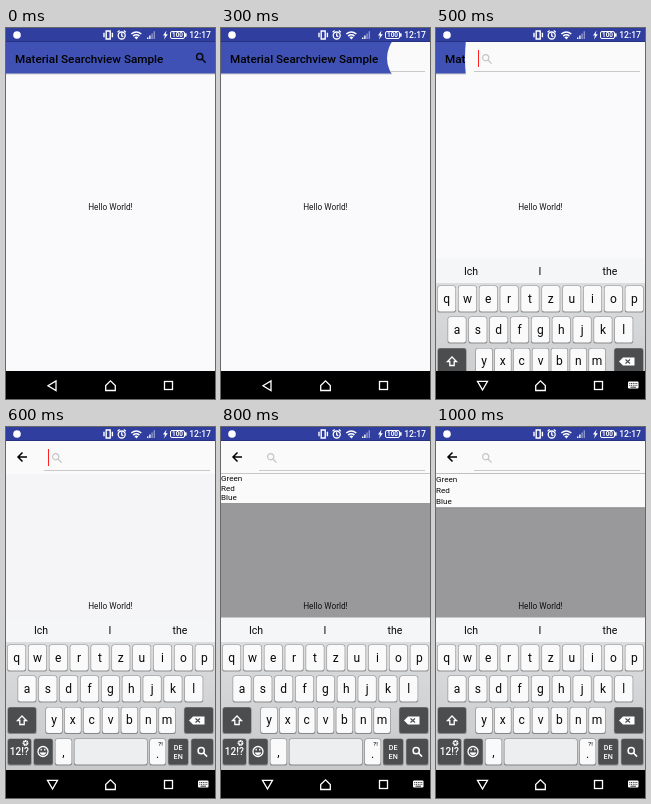
An HTML page that plays this animation: 209x371 px, repeating every 1100 ms.

```html
<!DOCTYPE html>
<html lang="en">
<head>
<meta charset="utf-8">
<title>Search view</title>
<style>
html, body { margin: 0; width: 100%; height: 100%; overflow: hidden; background: #fafafc; }
svg { display: block; width: 100vw; height: 100vh; font-family: Roboto, "Noto Sans", sans-serif; }
.line { fill: none; stroke: #fff; }
.mid { text-anchor: middle; }

/* every change is a hard cut on a 100 ms beat */
.reveal, .nav-idle, .nav-typing, .keyboard, .caret, .scrim, .list {
  animation: 1100ms step-end infinite;
}
.reveal { animation-name: reveal; }
.nav-idle { animation-name: navIdle; }
.nav-typing { animation-name: navTyping; }
.keyboard { animation-name: keyboard; }
.caret { animation-name: caret; }
.scrim { animation-name: scrim; }
.list { animation-name: list; transform-origin: 0 46px; }

@keyframes reveal {
  0% { r: 0px; }
  27.27% { r: 29px; }
  36.36% { r: 98.5px; }
  45.45% { r: 166px; }
  54.54%, 100% { r: 220px; }
}
@keyframes navIdle { 0% { opacity: 1; } 36.36%, 100% { opacity: 0; } }
@keyframes navTyping { 0% { opacity: 0; } 36.36%, 100% { opacity: 1; } }
@keyframes keyboard {
  0% { opacity: 0; transform: translateY(153px); }
  45.45% { opacity: 1; transform: translateY(40px); }
  54.54%, 100% { opacity: 1; transform: translateY(0); }
}
@keyframes caret { 0% { opacity: 1; } 72.72%, 100% { opacity: 0; } }
@keyframes scrim {
  0% { opacity: 0; }
  54.54% { opacity: .02; }
  63.63% { opacity: .2; }
  72.72%, 100% { opacity: .39; }
}
@keyframes list {
  0% { opacity: 0; transform: scaleY(0); }
  63.63% { opacity: 1; transform: scaleY(.42); }
  72.72% { opacity: 1; transform: scaleY(.88); }
  81.81%, 100% { opacity: 1; transform: scaleY(1); }
}
</style>
</head>
<body>
<svg viewBox="0 0 209 371">
  <defs>
    <clipPath id="hole"><circle class="reveal" cx="195" cy="30" r="0"/></clipPath>
    <clipPath id="bar"><rect y="14" width="209" height="33"/></clipPath>
    <clipPath id="app"><rect width="209" height="343"/></clipPath>
    <linearGradient id="tray" x2="0" y2="1">
      <stop stop-color="#dcdddf"/><stop offset="1" stop-color="#c6c8ca"/>
    </linearGradient>
    <linearGradient id="shade" x2="0" y2="1">
      <stop stop-opacity=".25"/><stop offset="1" stop-opacity="0"/>
    </linearGradient>
    <g id="lens" fill="none">
      <circle cx="-1.3" cy="-1.3" r="3.1"/><path d="M1 1 4.6 4.6"/>
    </g>
  </defs>

  <rect width="209" height="343" fill="#fafafc"/>
  <text class="mid" x="104.5" y="182" font-size="8.25" fill="#161616">Hello World!</text>
  <rect class="scrim" y="45" width="209" height="298"/>

  <g>
    <rect y="14" width="209" height="31.5" fill="#3f51b5"/>
    <rect y="45.5" width="209" height="1.5" fill="url(#shade)"/>
    <text x="9" y="35" font-size="11.7" font-weight="500">Material Searchview Sample</text>
    <use href="#lens" x="195" y="30" stroke="#0a0a18" stroke-width="1.5"/>
  </g>

  <g clip-path="url(#bar)">
    <g clip-path="url(#hole)">
      <rect y="14" width="209" height="33" fill="#fafafb"/>
      <path d="M21 30H12.5M16.5 25.5 12 30l4.5 4.5" fill="none" stroke="#000" stroke-width="1.5"/>
      <path d="M38 43.5H204" stroke="#c9c9c9"/>
      <use href="#lens" x="51" y="31" stroke="#c4c4c4" stroke-width="1.2"/>
      <rect class="caret" x="42" y="22" width="1" height="17" fill="#ff2222"/>
    </g>
  </g>

  <g class="list">
    <rect y="80.3" width="209" height="1.5" fill="url(#shade)"/>
    <rect y="46" width="209" height="34.3" fill="#fafafa"/>
    <path d="M0 46.4H209" stroke="#aaa" stroke-width=".8"/>
    <g font-size="8.1" fill="#080808">
      <text y="55">Green</text><text y="66">Red</text><text y="77">Blue</text>
    </g>
  </g>

  <g clip-path="url(#app)">
    <g class="keyboard">
      <rect y="190.5" width="209" height="26" fill="#f5f6f7"/>
      <rect y="215" width="209" height="128" fill="url(#tray)"/>
      <g class="mid" font-size="10.5" fill="#080808">
        <text x="35" y="207">Ich</text><text x="104" y="207">I</text><text x="174" y="207">the</text>
      </g>
      <g id="keys"></g>
      <g class="line" stroke-width="1.3">
        <path d="M16 289l-4.5 4.5h2.3v4h4.4v-4h2.3z"/>
        <circle cx="37" cy="324.5" r="5"/>
        <path d="M34 325.8h6q-3 4.4-6 0z" fill="#fff" stroke-width=".6"/>
        <path d="M35.2 321.8v1.6M38.8 321.8v1.6"/>
        <circle cx="19.5" cy="316" r="2" stroke-width="1.9" stroke-dasharray="1.3 .3"/>
        <use href="#lens" x="196.5" y="325" stroke-width="1.5"/>
      </g>
      <path d="M187 289.5h11.5v8H187l-4-4z" fill="#fff"/>
      <path d="M189.5 291.5l4.5 4M194 291.5l-4.5 4" stroke="#4b4d4f" stroke-width="1.2"/>
    </g>
  </g>

  <rect width="209" height="14" fill="#303f9f"/>
  <rect y="13" width="209" height="1" opacity=".2"/>
  <g fill="#fff">
    <circle cx="11" cy="7" r="3.8"/>
    <path class="line" d="M100.2 3h4v8h-4zM98 4.8v4.4M106.4 4.8v4.4" stroke-width="1.4"/>
    <g class="line" stroke-width="1.3">
      <circle cx="115.7" cy="7.5" r="3.5"/>
      <path d="M115.7 5.3v2.5l1.6 1M111.6 4.2l2-1.6M119.8 4.2l-2-1.6"/>
    </g>
    <path class="line" d="M125.3 6q5-4 10 0M127.2 8q3.1-2.4 6.2 0" stroke-width="1.6"/>
    <path d="M128.4 9.2q2-1.3 4 0l-2 2.3z"/>
    <path d="M141 11V9.4h1.4V11zM143.2 11V7.6h1.4V11z"/>
    <path d="M145.4 11V5.5h1.4V11zM147.6 11V3.2h1.4V11z" opacity=".45"/>
    <path d="M160.5 2.5l-3.5 5h2l-1 4 3.8-5.3h-2.1z"/>
    <rect class="line" x="164.5" y="3.5" width="14" height="7" rx="1.5"/>
    <rect x="179" y="5.3" width="1.6" height="3.4"/>
    <text class="mid" x="171.5" y="9.3" font-size="6.4" font-weight="700">100</text>
    <text x="205" y="10.2" font-size="8.6" font-weight="500" text-anchor="end">12:17</text>
  </g>

  <rect y="343" width="209" height="28"/>
  <g class="line" stroke-width="1.3">
    <path class="nav-idle" d="M50 353v9.6L42 357.8z"/>
    <g class="nav-typing">
      <path d="M41.5 353.3h10L46.5 362z"/>
      <rect x="192" y="353.5" width="10.5" height="7" rx="1" fill="#fff" stroke="none"/>
      <path d="M193.3 355.5h8M193.3 357.3h8" stroke="#000" stroke-width=".8" stroke-dasharray="1 .75"/>
      <path d="M194.5 359.2h5.5" stroke="#000" stroke-width=".8"/>
    </g>
    <path d="M99.7 357.5l4.8-4.6 4.8 4.6v5h-9.6z"/>
    <rect x="158.5" y="353.5" width="8" height="8"/>
  </g>
</svg>
<script>
const keys = document.getElementById("keys");

function add(tag, attrs, text = "") {
  const el = document.createElementNS("http://www.w3.org/2000/svg", tag);
  for (const name in attrs) el.setAttribute(name, attrs[name]);
  el.textContent = text;
  keys.append(el);
}

function label(text, x, y, size, fill = "#080808", weight = 400) {
  add("text", { x, y, class: "mid", "font-size": size, fill, "font-weight": weight }, text);
}

function key(x, y, width, fill = "#fafafb") {
  const edge = { x: x - 0.6, y: y - 0.4, width: width + 1.2, height: 27, rx: 2.6 };
  add("rect", { ...edge, fill: "#000", opacity: 0.34 });
  add("rect", { x, y, width, height: 25.5, rx: 2.2, fill });
}

function row(letters, first, pitch, width, y) {
  [...letters].forEach((letter, i) => {
    const x = first + i * pitch;
    key(x - width / 2, y, width);
    label(letter, x, y + 16.8, 12);
  });
}

row("qwertzuiop", 10.6, 20.85, 17.6, 218);
row("asdfghjkl", 21, 20.85, 17.6, 249);
row("yxcvbnm", 48, 18.85, 16, 280.5);

const dark = "#4b4d4f";
key(2, 280.5, 28, dark);
key(178.5, 280.5, 28.5, dark);
key(2, 312, 23, dark);
key(28, 312, 18.5, dark);
key(49.5, 312, 16);
key(68.5, 312, 72.5, "#eceef0");
key(144, 312, 15.5);
key(162.5, 312, 19.5, dark);
key(185.5, 312, 21.5, dark);

label("12!?", 13.3, 328.3, 10, "#fff", 500);
label(",", 57.5, 329, 12);
label(".", 151.5, 331, 12);
label("?!", 154.5, 318.5, 6, "#222", 500);
label("DE", 172.2, 323, 7.2, "#fff", 500);
label("EN", 172.2, 331.5, 7.2, "#fff", 500);
</script>
</body>
</html>
```
